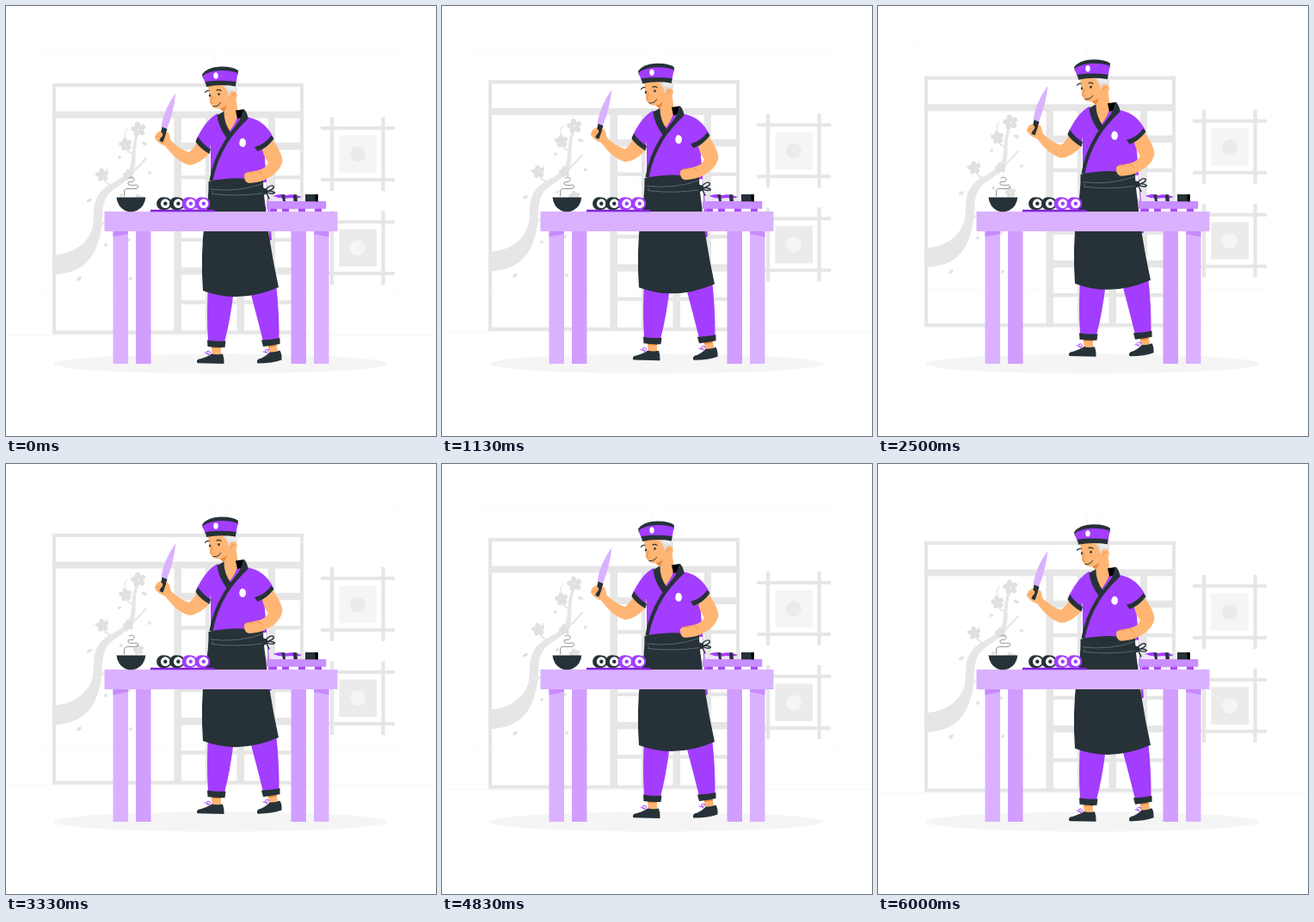
An HTML page with a canvas for the animation above (6040 ms loop, 500x500 px).

```html
<!DOCTYPE html>
<html lang="en">
<head>
<meta charset="utf-8">
<title>Sushi chef</title>
<style>
html, body { margin: 0; width: 100%; height: 100%; overflow: hidden; background: #fff; }
canvas { display: block; width: 500px; height: 500px; }
</style>
</head>
<body>
<canvas id="stage"></canvas>
<script>
const LOOP = 6040, RISE = 10;
const DARK = '#263238', PURPLE = '#a33dff', LILAC = '#dab1ff', ORCHID = '#d19eff';
const SKIN = '#ffb573', SKIN_LINE = '#ed893e', GREY = '#e6e6e6', PALE = '#f5f5f5';

const canvas = document.getElementById('stage');
const ctx = canvas.getContext('2d');
const ratio = window.devicePixelRatio || 1;
canvas.width = canvas.height = 500 * ratio;

function fill(color, d) {
  ctx.fillStyle = color;
  ctx.fill(new Path2D(d));
}
function line(color, width, d) {
  ctx.strokeStyle = color;
  ctx.lineWidth = width;
  ctx.lineCap = ctx.lineJoin = 'round';
  ctx.stroke(new Path2D(d));
}
function box(color, x, y, x2, y2) {
  ctx.fillStyle = color;
  ctx.fillRect(x, y, x2 - x, y2 - y);
}
function oval(color, x, y, rx, ry = rx, turn = 0) {
  ctx.fillStyle = color;
  ctx.beginPath();
  ctx.ellipse(x, y, rx, ry, turn, 0, Math.PI * 2);
  ctx.fill();
}

function wall() {
  line('#fafafa', 1, 'M43 55.5H239Q243 55.5 243 59V333Q243 337 239 337H43Q39 337 39 333V59Q39 55.5 43 55.5Z');
  line('#fafafa', 1, 'M259 55.5H454Q458 55.5 458 59V333Q458 337 454 337H259Q255 337 255 333V59Q255 55.5 259 55.5Z');
  box('#f2f2f2', 0, 382, 500, 382.6);
  box('#f8f8f8', 53, 394, 97, 394.6);
  box('#f8f8f8', 395, 394, 440, 394.6);
}

function screen() {
  ctx.strokeStyle = GREY;
  ctx.lineWidth = 4.2;
  ctx.lineJoin = 'miter';
  ctx.strokeRect(56, 92, 288, 287.5);
  box(GREY, 56, 122.5, 344, 130.5);
  box(GREY, 195.5, 130, 204, 380);
  box(GREY, 232, 130, 236.5, 380);
  box(GREY, 268.5, 130, 277, 380);
  box(GREY, 305, 130, 313, 380);
  for (let i = 0; i < 6; i++) {
    const y = 163 + i * 36.3, h = i === 0 || i === 4 ? 4.2 : 2.2;
    box(GREY, 204, y - h, 344, y + h);
  }
}

function blossom(x, y, r) {
  for (let i = 0; i < 5; i++) {
    const a = i * Math.PI * 0.4 - 0.5;
    oval('#e0e0e0', x + Math.cos(a) * r * 0.6, y + Math.sin(a) * r * 0.6, r * 0.5, r * 0.4, a);
  }
}

function tree() {
  fill(GREY, 'M58 289.5Q90 286 100 260C104 247 99 232 108 219C116 206 134 205 143 190C148 181 144 167 151 149L154 149C148 168 153 182 148 193C140 208 122 211 116 224C109 237 115 254 107 275C99 302 79 311 58 312Z');
  line(GREY, 2, 'M136 203Q151 191 163 177M123 209Q113 205 112 196M148 172Q139 170 139 160M107 263Q108 253 119 250');
  line(GREY, 1.2, 'M112 198L103 195M113 199L118 189M139 160L138 148L141 143M139 160L131 158M153 148L160 143');
  blossom(154, 143.5, 8);
  blossom(139, 161, 7);
  blossom(112, 196.5, 7);
  blossom(142.5, 196.5, 6);
  blossom(154, 225, 6);
  const petals = [[161, 160], [132, 176], [167, 194], [97, 226], [116, 278], [145, 317], [85, 317], [143, 272], [134, 220]];
  petals.forEach(([x, y], i) => oval('#e2e2e2', x, y, i % 3 ? 2.1 : 3.3, 1.8, i % 2 ? -0.5 : i === 0 ? 0.4 : -0.8));
}

function picture(y, square, dot) {
  box(GREY, 366, y + 11, 452, y + 15);
  box(GREY, 366, y + 71, 452, y + 75);
  box(GREY, 377, y, 381.2, y + 86);
  box(GREY, 436.5, y, 440.7, y + 86);
  box(square, 387.5, y + 21.5, 431, y + 65);
  oval(dot, 409, y + 43.3, 9);
}

function legs() {
  fill(SKIN_LINE, 'M239 395H250L250 406H240Z');
  fill(SKIN, 'M239.5 398H250V406H241Z');
  fill(SKIN_LINE, 'M304.5 394L314.5 393L316 403L307 405Z');
  fill(SKIN, 'M305.5 397L315 395.5L316 403L307 405Z');
  fill(DARK, 'M222 413Q222 410.5 227 410Q234 408 239 404.5Q246 406 252 404.5Q254 410 253.5 416L223 415.3Q221.5 415 222 413Z');
  fill(DARK, 'M292 412.5Q293 410 297 409.5Q304 406 306.500 402.5Q313 403 318.500 400.5Q321 405 320.5 411.5Q310 415.5 293 415.6Q291.500 415 292 412.5Z');
  line(PURPLE, 0.9, 'M231 403L235 405L238 403L236 401L233 402L237 407M299 402L303 403L306 400L303 399L301 401L305 405');
  fill(PURPLE, 'M235 325L265 330Q261 365 254 391L235 390Q233 360 235 325Z');
  fill(PURPLE, 'M284 328L314 322Q318 358 317.500 388L299 390Q292 362 284 332Z');
  fill(DARK, 'M234 388.500Q244 390.5 255.500 389.5L254.5 397Q244 397.500 234.500 396Z');
  fill(DARK, 'M297 388.500Q308 388 318.500 386L318.500 393Q309 395 299 396Z');
}

function torso() {
  fill(PURPLE, 'M246 125Q232 132 220.5 157L236.500 171L238 160L238 205L303 205L306 262L305.500 273L309 272L303 201L300 166L311 153Q301 133 282 129.500L272 124L254 146Z');
  fill(DARK, 'M223 152Q229 161 238 166.500L236.500 172Q226 166 220.5 158Z');
  fill(DARK, 'M289 164Q301 161 308.500 150.500L311.500 154.500Q303 166 292.500 169Z');
  fill(SKIN, 'M254 110L267 104L269.500 122Q271 132 258 148Q250 138 254 124Z');
  fill(SKIN_LINE, 'M248 119Q254 118 257 114Q256 120 253 123Z');
  fill(DARK, 'M245.500 127L253.500 122.500Q253 136 262 148L257 154Q247 141 245.500 127Z');
  fill('#000', 'M267 121.500L277 120L273 130L269 131Z');
  fill(DARK, 'M277 120Q281 125 281.500 131Q265 147 257 160Q245 180 240.500 203L236.500 203Q240 180 254 157Q263 144 271 134Q274 128 277 120Z');
  fill('#fff', 'M275 153.800Q279 154.500 279 159Q278.500 164 275 164Q271 163 271.300 158.500Q272 154 275 153.800Z');
}

function apron() {
  fill(DARK, 'M235.500 204Q267 197 299 203Q299 215 302 235Q304 258 307 274Q311 300 317 327Q271 347 229 331Q226 290 231 249Q236 225 235.500 204Z');
  line('#69757b', 0.8, 'M238 213Q270 217 299 206.500M240 218.500Q270 222 300 217.500M240 215.500V218');
  line(DARK, 1.4, 'M301 215Q307 207 311 209.500Q313 213 302 216Q309 214 312.500 217Q310 220 302 216M302 216L306 224');
  fill(DARK, 'M298 211L304 213V218L299 220Z');
}

function nearArm() {
  fill(SKIN, 'M292 169Q303 166 310.500 156Q321 171 321.500 180Q319 193 303 201Q297 205 283 206Q277 205 277 198Q276 194 283 193L291 191.500Q303 189 305 182Q300 176 298 167Z');
  line(SKIN_LINE, 0.8, 'M279 194Q285 192 288 194M292 192Q296 193 298 196');
}

function knifeArm() {
  fill(SKIN, 'M221.500 159.500Q228 167 236 172Q225 184 213 185Q198 181 184 161L190 155Q202 167 213 170Q219 165 221.500 159.500Z');
  fill(SKIN, 'M180 145Q185 142 190 151L192 158L188 163Q179 162 174 155Q171 151 177 149Z');
  fill(LILAC, 'M197.500 101Q184 119 180.500 140L187 143Q195 123 197.500 101Z');
  fill(DARK, 'M181.500 140.500L187.500 143L185.500 150L182.500 158.500L178.500 157L180 148Z');
  fill(SKIN, 'M174 151Q174 147 179 145.500L182 148Q183 151 180 153L177 157Q173 155 174 151Z');
  fill(SKIN, 'M186 146Q191 147 190.500 155L184 157Q187 151 186 146Z');
  line(SKIN_LINE, 0.7, 'M175 152Q178 152 180 150M178 156L180 153');
}

function head() {
  fill(SKIN, 'M235 92L257 91L263 101L260 112Q254 119 246 119.500Q239 119 237 111Z');
  fill('#e0e0e0', 'M252 93L268 91Q270 97 267.500 104L264 101L260 104L258 105Q259 98 252 93Z');
  fill('#ebebeb', 'M257 92L268 91L267 98L258 97Z');
  oval(SKIN, 264, 104.500, 4.800, 5.200, 0.3);
  line(SKIN_LINE, 0.8, 'M262 106Q263 102 266 102.500');
  line(SKIN_LINE, 1, 'M240 105Q239 109 237.800 112.500Q239 114 241 113');
  line(DARK, 1, 'M241 116.500Q247 117.500 249.500 112.500');
  line(DARK, 1.2, 'M231.500 100.500Q233 98 236 98.500M245 98Q247 96.500 250 98.500');
  oval(DARK, 237, 104, 1.1, 1.5);
  oval(DARK, 247.500, 102.500, 1.200, 1.600);
  fill(DARK, 'M228 79.500Q234 71 249 70.500Q264 70 270 75L269.500 80L229 84Z');
  fill(PURPLE, 'M228.500 81Q237 75.500 249 75Q261 74.500 269.500 78L267.500 90L232 91Z');
  fill(DARK, 'M232 88Q249 85.500 267.500 88L267 93.500Q249 90.500 233 94Z');
  oval('#fff', 244, 81, 2.7, 3.7);
}

function table() {
  box(ORCHID, 151, 262, 168.500, 416);
  box(ORCHID, 331.500, 262, 349, 416);
  box(LILAC, 124.500, 262, 142, 416);
  box(LILAC, 358, 262, 375.500, 416);
  fill('#c88bff', 'M124.500 262H142V265L124.500 268.500ZM358 262H375.500V268.500L358 265Z');
  box(LILAC, 114.500, 239, 385.500, 262);
}

function roll(x, rim, core) {
  oval(rim, x - 1.500, 229.700, 7.400);
  oval(rim, x + 1.500, 229.700, 7.200);
  oval('#fff', x + 1.300, 229.700, 5.400);
  oval(core, x + 1.300, 229.700, 2.200);
}

function food() {
  line('#8b8b8b', 0.9, 'M137.500 221V215Q138 212.500 141 212.500H151Q154 212 153.500 209Q153 207.500 150 208.300H144Q141 207.500 142 205Q143 204.300 147 204.500Q150 203 149 200.500Q147 198 143 200');
  fill(DARK, 'M128.500 222.500H162.300Q161.500 233 152 238Q145 240.500 138.500 238Q129.500 233 128.500 222.500Z');
  box('#8524dc', 168, 236.800, 242.500, 239.300);
  roll(184, DARK, DARK);
  roll(199, DARK, DARK);
  roll(213.500, PURPLE, PURPLE);
  roll(228.500, PURPLE, PURPLE);

  for (const x of [307, 321, 340, 359]) box('#a949f6', x, 235, x + 8, 239);
  box('#c98eff', 303, 227, 372.300, 235.800);
  fill('#f1e2ff', 'M312 222H342V227H311Z');
  fill(PURPLE, 'M310.500 221Q318 217.500 326 220Q335 218 344 222Q339 225 331 223Q320 225 310.500 221Z');
  fill(DARK, 'M320.500 219.200H324L325 227H322ZM334 219.200H338L339 227H334.500Z');
  fill(DARK, 'M348 219H362.500V227.300H348Z');
  fill('#000', 'M359 219H362.800V227.300H360Z');
}

function draw(time) {
  const phase = (time % LOOP) / LOOP;
  const lift = RISE * (1 - Math.abs(1 - 2 * phase));
  ctx.setTransform(ratio, 0, 0, ratio, 0, 0);
  box('#fff', 0, 0, 500, 500);

  ctx.save();
  ctx.translate(0, -lift);
  wall();
  screen();
  tree();
  picture(129, PALE, '#ebebeb');
  picture(238, '#ebebeb', PALE);
  ctx.restore();

  oval(PALE, 249.500, 416, 194, 11.500);

  ctx.save();
  ctx.translate(0, -lift);
  legs();
  knifeArm();
  torso();
  head();
  apron();
  nearArm();
  ctx.restore();

  table();
  food();
}

const start = performance.now();
function tick() {
  draw(performance.now() - start);
  requestAnimationFrame(tick);
}
tick();
</script>
</body>
</html>
```
